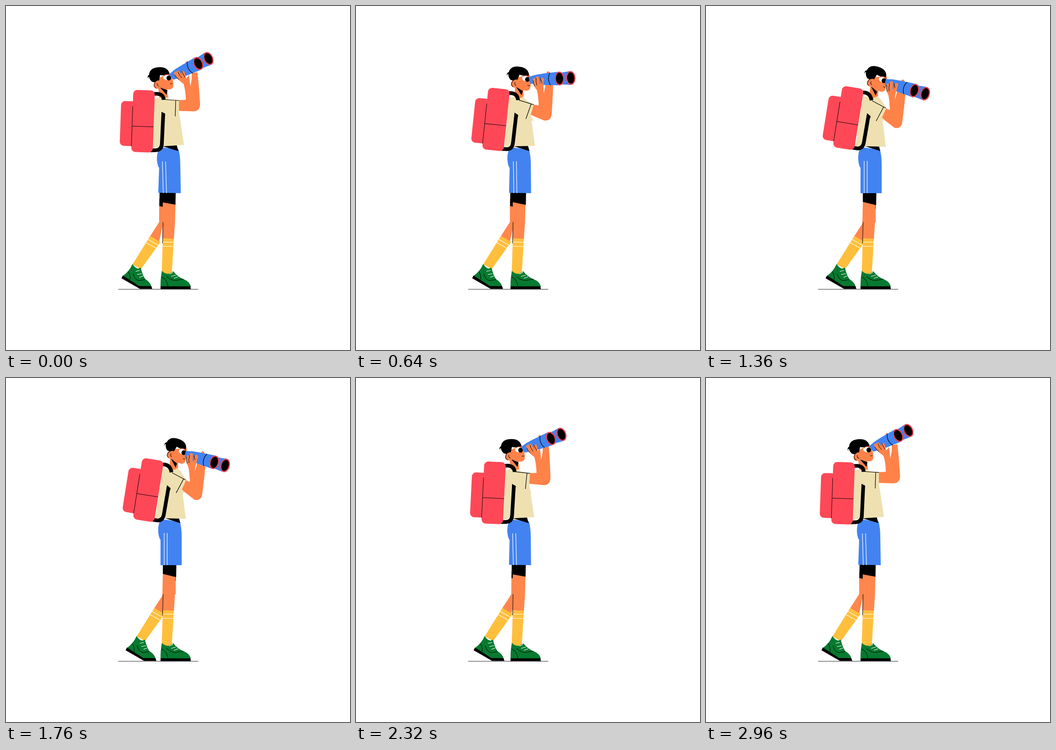
Animation, 748 px wide and 748 px high, one loop 3.04 s. Source, as an HTML page with a canvas:

```html
<!DOCTYPE html>
<html>
<head>
<meta charset="utf-8">
<style>
html, body { margin: 0; width: 100%; height: 100%; overflow: hidden; background: #fff }
canvas { display: block }
</style>
</head>
<body>
<canvas id="stage" width="748" height="748"></canvas>
<script>
const ctx = document.getElementById('stage').getContext('2d');
const LOOP = 3040, STEP = 80;
const SKIN = '#ff8249', LEG = '#ff864c', BLUE = '#4283f1', RED = '#ff4857', SHIRT = '#eee0b1',
  SOCK = '#ffbf3d', GREEN = '#067a30', BLACK = '#000', WHITE = '#fff', RIM = '#e8424f';

// Upper body: 0 looks up, 1 looks down
const keys = [[0, 0], [400, .24], [560, .44], [960, 1], [1080, 1.03], [1280, 1], [1680, 1],
  [1760, .99], [2000, .57], [2320, .11], [2640, 0], [3040, 0]];

function curve(t) {
  const i = Math.max(1, keys.findIndex(k => k[0] > t));
  const slope = j => {
    const a = keys[j - 1], b = keys[j + 1];
    return a && b ? (b[1] - a[1]) / (b[0] - a[0]) : 0;
  };
  const [t0, v0] = keys[i - 1], [t1, v1] = keys[i], d = t1 - t0, x = (t - t0) / d;
  return v0 + (v1 - v0) * x * x * (3 - 2 * x)
    + d * x * (1 - x) * (slope(i - 1) * (1 - x) - slope(i) * x);
}

const lerp = (a, b, k) => a + (b - a) * k;
const smooth = (a, b, t) => {
  const x = Math.min(1, Math.max(0, (t - a) / (b - a)));
  return x * x * (3 - 2 * x);
};

// Blend two paths of the same structure, with separate amounts for x and y
function mix(a, b, kx, ky = kx) {
  const n = b.match(/-?[\d.]+/g);
  let i = 0;
  return a.replace(/-?[\d.]+/g, s => lerp(+s, +n[i], i++ % 2 ? ky : kx).toFixed(3));
}
function fill(color, d) {
  ctx.fillStyle = color;
  ctx.fill(new Path2D(d));
}
function line(color, width, d) {
  ctx.strokeStyle = color;
  ctx.lineWidth = width;
  ctx.stroke(new Path2D(d));
}
function oval(color, x, y, rx, ry, turn = 0) {
  ctx.fillStyle = color;
  ctx.beginPath();
  ctx.ellipse(x, y, rx, ry, turn, 0, 7);
  ctx.fill();
}
function box(color, x, y, w, h, r) {
  ctx.fillStyle = color;
  ctx.beginPath();
  ctx.roundRect(x, y, w, h, r);
  ctx.fill();
}
function group(x, y, degrees, draw) {
  ctx.save();
  ctx.translate(x, y);
  ctx.rotate(degrees * Math.PI / 180);
  draw();
  ctx.restore();
}

function farLeg() {
  fill(LEG, 'M333 420L360 420L360 470L341 475L333 513L313 501L333 470Z');
  fill(BLACK, 'M334 400L360 400L360 441L333.5 435Z');
  fill(SOCK, 'M313.5 500L336 513L293.5 572L275 562Z');
  line(WHITE, 1.1, 'M308.5 507.5L331 520M304.5 514.5L327 527');
  fill(GREEN, 'M275 561Q268 577 254 587L290 609L316 609Q313 600 303 594Q297 586 293 569L287 571Q280 569 275 561Z');
  fill(BLACK, 'M254 586L290 609L316 609L318 615L291 615L251 592Z');
  line(BLACK, 1, 'M265 577Q270 582 270 595M276 582Q281 597 289 597L303 595');
  line(WHITE, 1.1, 'M282 577L291 575M285 584L295 582M290 590L298 587');
}

function nearLeg(p) {
  fill(LEG, 'M341 425L368.5 430L367.5 470L365 507L340 507L340 470Z');
  fill(BLACK, mix('M341 404L369 404L368.5 432L340.5 427Z', 'M341 404L370.5 404L370 433L341 426Z', p));
  fill(SOCK, 'M341 505L365 506L360.5 582L338.5 582Z');
  line(WHITE, 1.1, 'M341 513.5L365 513.5M341 522.5L364 523');
  line(BLACK, 1, 'M341.5 470L340.5 516');
  fill(GREEN, 'M339 576Q336 590 336 610L402 610Q399 599 386 594Q373 589 364 577L357 581Q348 585 339 576Z');
  fill(BLACK, 'M336 609.5L401 609.5L402 615.5L336 615.5Z');
  line(BLACK, 1, 'M338 589Q350 594 352 609M349 588Q358 596 367 597L386 594');
  line(WHITE, 1.1, 'M355 583L363 579.5M359 588L369 585M365 592L374 589');
}

function shorts(p, g) {
  fill(BLUE, mix('M334 307Q324 328 331 349L333 352L331 406L380 407L379 345Q379 325 375 312Z',
    'M336 307Q327 328 334 349L336 352L336 407L382 407L382 345Q382 325 378 312Z', (p + g) / 2));
  line(WHITE, 1.2, mix('M340 338L342 407M347 338L349 407', 'M344 337L344 407M350.5 337L350.5 407', p));
  fill(BLACK, mix('M340 305L371 302L375 315.5Z', 'M343 304L376 304L379 315.5Z', p));
}

function head(p) {
  fill(SKIN, mix('M331 176L350 180L353 202L334 206Z', 'M358 170L375 180L374 200L354 204Z', p));
  fill(BLACK, mix('M335 177L351 183L349 193Z', 'M359 175L372 186L369 195Z', p));
  group(lerp(328, 357, p), lerp(172, 167, p), 22 * p, () => {
    fill(SKIN, 'M-6 -10L28 -27Q32 -20 35 -10L36 0Q36 9 26 9.5Q12 9 6 3L-4 6Z');
    fill(BLACK, 'M-10 -7Q-16 -12 -17 -18Q-20 -18 -18 -13Q-22 -18 -18 -22L-17 -22Q-16 -38 5 -39Q22 -40 27 -27L27 -24Q13 -20 7 -22L5 -10Q0 -11 -3 -6Z');
    oval(SKIN, 1, 0, 8, 8);
    line(BLACK, 1, 'M-4 -6Q-9 3 -1 7M1 -4Q0 1 5 3');
    oval(WHITE, 21.5, -16.5, 7.5, 5.8, .15);
    oval(BLACK, 26, -15.5, 5, 5.3);
    line('#b5301c', 1.3, 'M15 -20Q22 -26 30 -21');
    line(BLACK, 1, 'M29 -3Q32 -2 34 -4');
  });
}

function arm(p, q) {
  fill(SKIN, mix('M370 205L391 204Q391 184 385 166L398 150L401 175L404 158L404 146L416 144Q419 165 422 213Q422 229 407 229L370 228Z',
    'M384 220L400 226Q399 206 396 188L411 180L411 203L415 188L417 178L434 182Q433 205 427 250Q426 268 410 265L378 240Z', q, p));
}

function binoculars(p, q, t) {
  oval(SKIN, lerp(394, 428, q), lerp(124, 164, p), 3.5, 4);
  group(lerp(418, 453, q), lerp(125, 184, p), lerp(-26, 16, p), () => {
    fill(BLUE, 'M-50 -6L-8 -11L24 -15L24 15L-8 12Z');
    line(BLACK, 1.2, 'M5 -13Q0 -8 0 0');
    lens(24.5);
    fill(BLUE, 'M-66 -7L-52 -10.5L-34 -12.5L0 -15L0 15L-34 12.5L-58 9L-64 8Q-67 0 -66 -7Z');
    line(BLACK, 1.2, 'M-20 -13.5Q-28 0 -20 13.5');
    lens(0);
    const k = (t - 1840) / 320;
    if (k > 0 && k < 1) {
      ctx.beginPath();
      ctx.ellipse(0, 0, 7.8, 12.3, 0, 0, 7);
      ctx.clip();
      ctx.rotate(.6);
      ctx.fillStyle = WHITE;
      ctx.fillRect(-20, lerp(22, -22, k) - 4, 40, 8);
    }
  });
}
function lens(x) {
  oval(RIM, x, 0, 10.3, 15);
  oval(BLACK, x, 0, 7.8, 12.3);
}

function fingers(p, q) {
  const at = (a, b) => mix(a, b, q, p);
  line(SKIN, 7, at('M369 146Q372 155 386 165M374 144L386 163M385 145L390 165L393 175',
    'M396 172Q394 182 400 193M403 167L402 190M414 171L409 190L405 200'));
  line(BLACK, 1, at('M367 150Q371 157 376 160M374 143Q376 150 382 156M382 142L389 155',
    'M393 172Q392 180 394 186M399 169Q397 177 398 185M409 169Q411 178 408 187'));
}

function torso(p, q) {
  fill(SHIRT, mix('M323 203L333 198Q342 204 351 198L354 203L376 206L376 229L387 302L343 305L321 308Z',
    'M341 197L355 197Q363 203 373 196L380 203L392 222L383 242L391 306L343 305L325 306Z', p));
  fill(SHIRT, mix('M360 204L376 205.5L375 232L379 250L360 250Z', 'M372 204L391 222L382 242L390 249L372 250Z', q, p));
  line(BLACK, 1.2, mix('M338 203L376 205.5M369 205L368 240', 'M361 206L391 222M386 220L370 250', q, p));
  line(BLACK, 8, mix('M320 191.5Q342 188 343 204', 'M340 188Q357 187 360 205', p));
  line(BLACK, 8, mix('M342 234L339 298Q339 313 326 313.5L314 314', 'M353.5 238L343 298Q340 311 328 309.5L318 308', p));
  fill(BLACK, mix('M338 230L346 234L345.8 238L338 238Z', 'M350.5 233L358 240L357 244L349 240Z', p));
}

function backpack(p) {
  group(lerp(298, 309.5, p), lerp(250.5, 243.5, p), lerp(2, 9.1, p), () => {
    box(RED, -49, -42.5, 36, 97.5, 9);
    box(RED, -23.5, -67.5, 47, 135, 9);
    line(BLACK, .9, 'M-23.5 -32L-23.5 55M-23.5 11.5L23.5 11.5');
  });
}

function draw(t) {
  const p = curve(t), q = 1.59 * p - .59 * p * p;
  const g = smooth(400, 1300, t) - smooth(1800, 2880, t);
  ctx.fillStyle = WHITE;
  ctx.fillRect(0, 0, 748, 748);
  line('#222', 1, 'M244 616L418 616');
  group(9 * g, 0, 0, farLeg);
  nearLeg(p);
  shorts(p, g);
  head(p);
  arm(p, q);
  binoculars(p, q, t);
  ctx.lineCap = 'round';
  ctx.lineJoin = 'round';
  fingers(p, q);
  ctx.lineCap = 'butt';
  torso(p, q);
  backpack(p);
}

const start = performance.now();
function tick() {
  const t = Math.max(0, performance.now() - start) % LOOP;
  draw(Math.floor(t / STEP) * STEP);
  requestAnimationFrame(tick);
}
tick();
</script>
</body>
</html>
```
